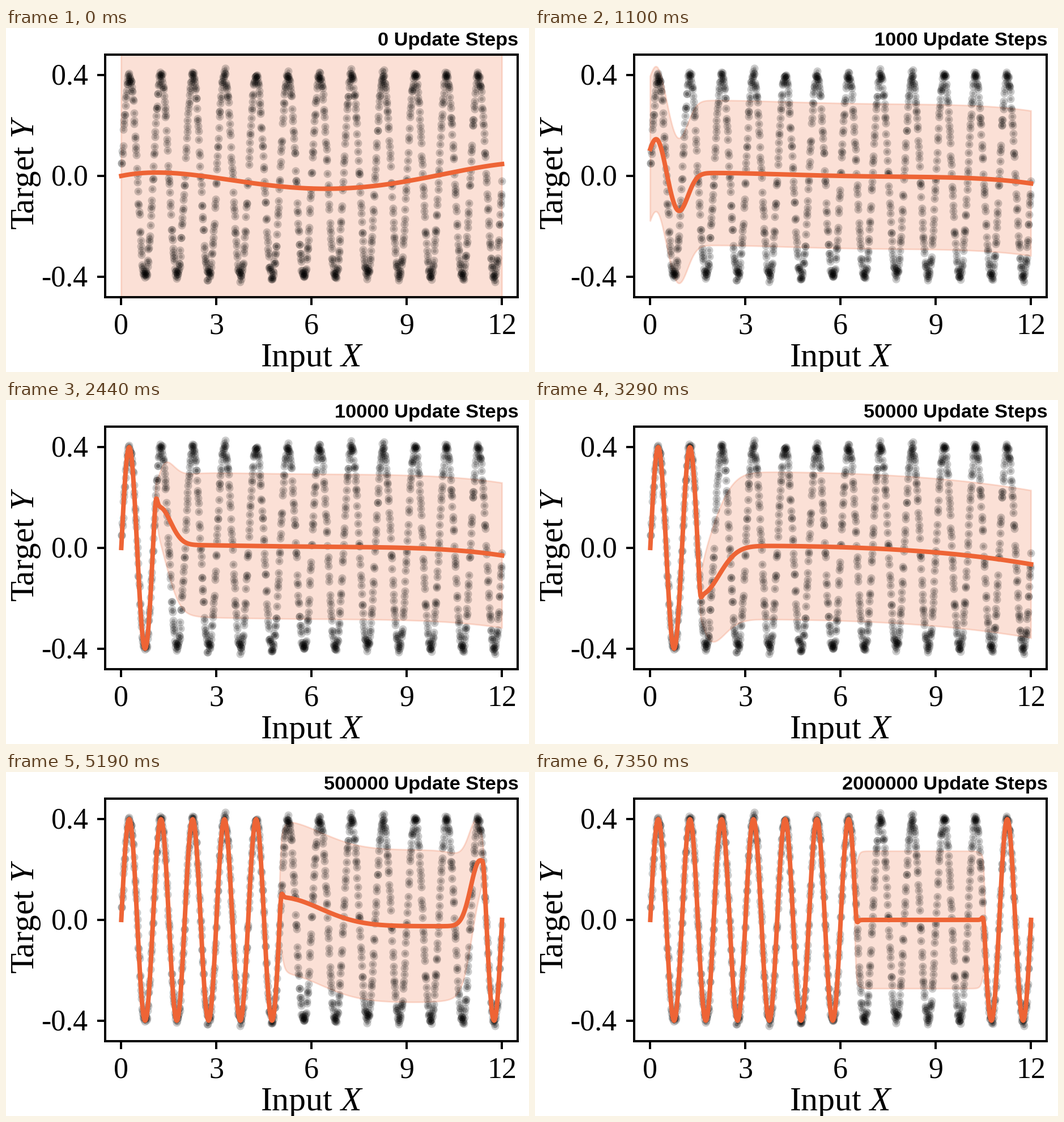
Animation, 923 px wide and 607 px high, one loop 8000 ms. Source, as a matplotlib script:

```python
import numpy as np
import matplotlib.pyplot as plt
from matplotlib.animation import FuncAnimation

W, H, DPI = 923, 607, 100
STEP = 20
ORANGE = "#ee6435"
HOLDS = [550, 550, 660, 680, 850, 870, 1030, 1050, 1110, 650]
CHANGES = np.cumsum(HOLDS)[:-1]
X = np.linspace(0, 12, 721)

plt.rcParams.update({
    "font.family": "Liberation Serif",
    "mathtext.fontset": "custom",
    "mathtext.rm": "Liberation Serif",
    "mathtext.it": "Liberation Serif:italic",
})


def pt(px):
    return px * 72 / DPI


def wave(x):
    return 0.4 * np.sin(2 * np.pi * x)


def logistic(d):
    return 1 / (1 + np.exp(-np.clip(d / 0.025, -50, 50)))


def ramp(d, k):
    return 1 - np.exp(-np.maximum(d, 0) / k)


stages = []


def add(steps, trend=(0,), bumps=(), spread=0.28, fit=(-9, 21), k=(.1, .1)):
    """Learned wave outside the fit interval, smooth trend plus bumps inside.

    trend: evenly spaced heights of a polynomial; bumps: (height, centre, width);
    k: how fast the uncertainty grows from either end of the interval.
    """
    a, b = fit
    n = len(trend)
    mean = np.polyval(np.polyfit(np.linspace(0, 12, n), trend, n - 1), X)
    for height, centre, width in bumps:
        mean = mean + height * np.exp(-((X - centre) / width) ** 2)
    learned = logistic(a - X) + logistic(X - b)
    mean = learned * wave(X) + (1 - learned) * mean

    half = .008 + spread * ramp(X - a + .08, k[0]) * ramp(b + .08 - X, k[1])
    band = np.column_stack([np.r_[X, X[::-1]], np.r_[mean + half, (mean - half)[::-1]]])
    stages.append((f"{steps} Update Steps", mean, band))


add(0, (0, -.008, -.05, -.021, .047), spread=2)
add(10, (.005, -.02, -.102, -.0995, -.056), spread=.17 + .67 * np.exp(-X / 2.75))
add(1000, (0, .01, 0, -.005, -.03), [(.15, .2, .35), (-.15, .9, .4)])
add(5000, (.13, .03, .02, .009, -.0145), [(-.29, .75, .38)],
    spread=.275, fit=(.6, 21), k=(.33, .1))
add(10000, (.01, .01, .005, 0, -.03), [(.15, 1.2, .5)], fit=(1.1, 21), k=(.33, .1))
add(50000, (0, .008, .003, -.018, -.065), [(-.19, 1.6, .8)],
    spread=.285, fit=(1.57, 21), k=(.33, .1))
add(100000, (0, .005, .0068, .008, -.098), [(-.13, 2.5, 1.2)],
    spread=.287, fit=(2.55, 21), k=(.3, .1))
add(500000, (-.025,), [(.115, 5, 1.8), (.26, 11.3, .4)],
    spread=.295, fit=(5.03, 11.42), k=(.08, .35))
add(1000000, fit=(5.48, 10.52))
add(2000000, spread=.265, fit=(6.48, 10.52), k=(.06, .06))

rng = np.random.default_rng(4)
N = 1000
sx = (np.arange(N) + rng.uniform(0, 1, N)) * 12 / N
sy = wave(sx) + rng.normal(0, .012, N)

fig = plt.figure(figsize=(W / DPI, H / DPI), dpi=DPI, facecolor="white")
ax = fig.add_axes([175 / W, 1 - 475 / H, 728 / W, 428 / H])
ax.set(xlim=(-.508, 12.492), ylim=(-.4815, .4815),
       xticks=range(0, 13, 3), yticks=[-.4, 0, .4], xticklabels=[], yticklabels=[])
ax.tick_params(length=pt(14), width=pt(4))
ax.spines[:].set_linewidth(pt(4))


def label(x, y, text, size, **kw):
    return fig.text(x / W, 1 - y / H, text, fontsize=pt(size), va="baseline", **kw)


for v in range(0, 13, 3):
    label(203 + 56 * v, 540, str(v), 52, ha="center")
for text, y in (("0.4", 100), ("0.0", 278), ("-0.4", 456)):
    label(144.5, y, text, 52, ha="right")
label(540, 597, "Input $X$", 60, ha="center")
label(49, 255, r"T$\!$arget $Y$", 59, ha="center", rotation=90, rotation_mode="anchor")
title = label(904.5, 31, "", 34.4, ha="right", family="Liberation Sans", weight="bold")

band, = ax.fill([0, 12, 12], [0, 0, 0], color=ORANGE, alpha=.2, lw=pt(2.8), zorder=1)
ax.plot(sx, sy, "o", color="black", alpha=.2, ms=pt(7), mew=pt(7), zorder=2)
line, = ax.plot(X, 0 * X, color=ORANGE, lw=pt(8), solid_capstyle="projecting", zorder=2.2)


def update(i):
    text, mean, outline = stages[np.searchsorted(CHANGES, i * STEP + STEP / 2, "right")]
    title.set_text(text)
    line.set_ydata(mean)
    band.set_xy(outline)
    return title, line, band


anim = FuncAnimation(fig, update, frames=sum(HOLDS) // STEP, interval=STEP,
                     repeat=True, cache_frame_data=False)
plt.show()
```
